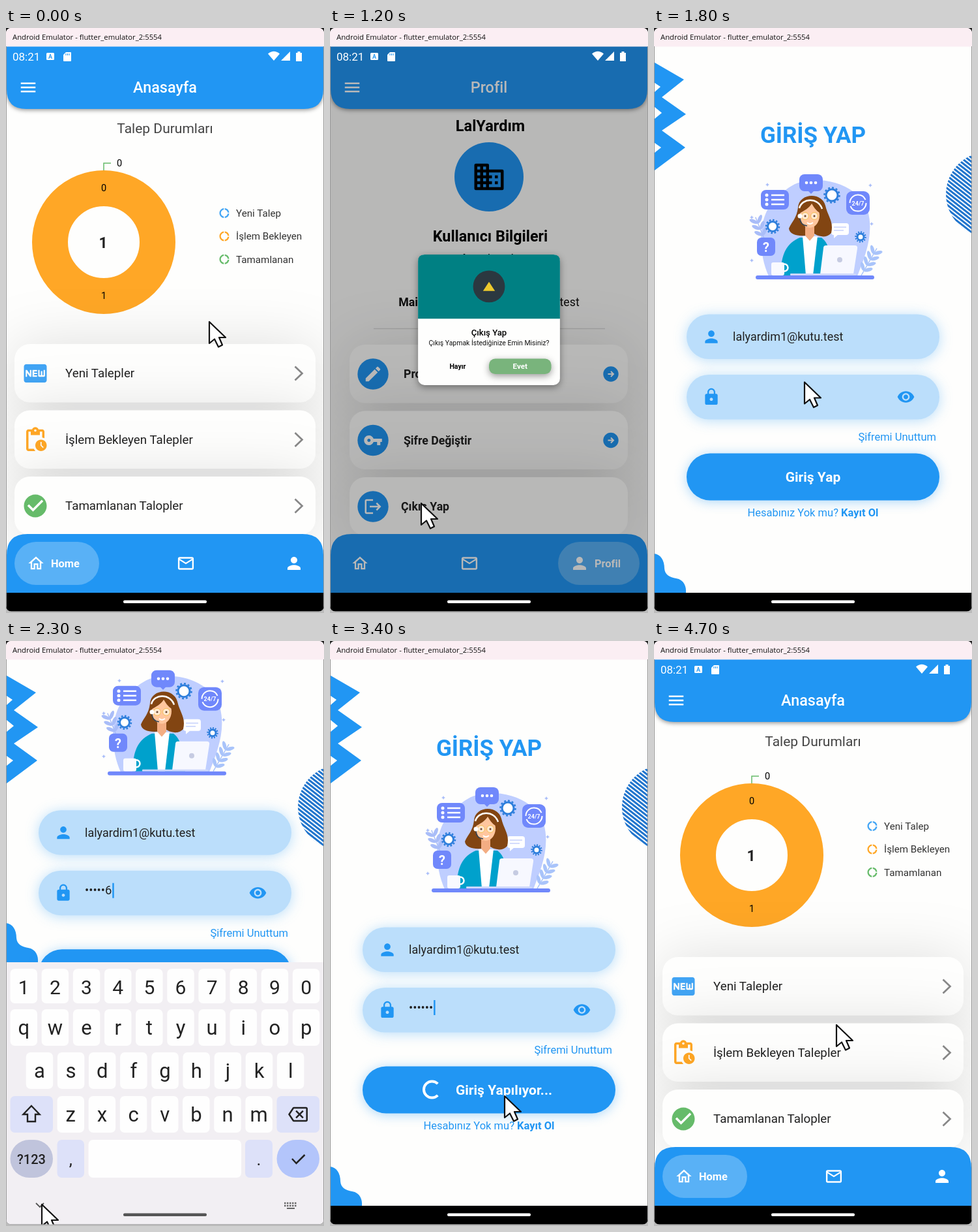
An HTML page for the animation above (4800 ms loop, 488 by 896 pixels).

```html
<!DOCTYPE html>
<html lang="tr">
<head>
<meta charset="utf-8">
<style>
  html, body { margin: 0; width: 100%; height: 100%; overflow: hidden; background: #bbb; }
  svg { display: block; width: 488px; height: 896px; font-family: Roboto, sans-serif; }
  .card { fill: #fefefd; filter: drop-shadow(0 3px 44px #0002); }
  .bar { fill: #2196f3; filter: drop-shadow(0 2px 3px #0006); }
  .field { fill: #bbdefb; filter: drop-shadow(0 2px 10px #2196f350); }
  .dialog { filter: drop-shadow(0 6px 10px #0006); }
</style>
</head>
<body>
<svg id="stage" viewBox="0 0 488 896"></svg>
<script>
const BLUE = '#2196f3', ORANGE = '#ffa726', GREEN = '#66bb6a', SKY = '#42a5f5', INK = '#212121';
const $ = id => document.getElementById(id);

const ICONS = {
  menu: 'M3 18h18v-2H3zM3 13h18v-2H3zM3 6v2h18V6z',
  home: 'M12 5.69l5 4.5V18h-2v-6H9v6H7v-7.81l5-4.5M12 3L2 12h3v8h6v-6h2v6h6v-8h3z',
  mail: 'M20 4H4c-1.1 0-2 .9-2 2v12c0 1.1.9 2 2 2h16c1.1 0 2-.9 2-2V6c0-1.1-.9-2-2-2zm0 14H4V8l8 5 8-5v10zm-8-7L4 6h16z',
  person: 'M12 12c2.21 0 4-1.79 4-4s-1.79-4-4-4-4 1.79-4 4 1.79 4 4 4zm0 2c-2.67 0-8 1.34-8 4v2h16v-2c0-2.66-5.33-4-8-4z',
  office: 'M12 7V4q0-1-1-1H3q-1 0-1 1v16q0 1 1 1h18q1 0 1-1V8q0-1-1-1zM6 19H4v-2h2zm0-4H4v-2h2zm0-4H4V9h2zm0-4H4V5h2zm4 12H8v-2h2zm0-4H8v-2h2zm0-4H8V9h2zm0-4H8V5h2zm10 12h-8v-2h2v-2h-2v-2h2v-2h-2V9h8zm-2-8h-2v2h2zm0 4h-2v2h2z',
  edit: 'M3 17.25V21h3.75L17.81 9.94l-3.75-3.75zM20.71 7.04c.39-.39.39-1.02 0-1.41l-2.34-2.34c-.39-.39-1.02-.39-1.41 0l-1.83 1.83 3.75 3.75z',
  key: 'M12.65 10C11.83 7.67 9.61 6 7 6c-3.31 0-6 2.69-6 6s2.69 6 6 6c2.61 0 4.83-1.67 5.65-4H17v4h4v-4h2v-4zM7 14c-1.1 0-2-.9-2-2s.9-2 2-2 2 .9 2 2-.9 2-2 2z',
  exit: 'M17 7l-1.41 1.41L18.17 11H8v2h10.17l-2.58 2.58L17 17l5-5zM4 5h8V3H4c-1.1 0-2 .9-2 2v14c0 1.1.9 2 2 2h8v-2H4z',
  lock: 'M18 8h-1V6c0-2.76-2.24-5-5-5S7 3.24 7 6v2H6c-1.1 0-2 .9-2 2v10c0 1.1.9 2 2 2h12c1.1 0 2-.9 2-2V10c0-1.1-.9-2-2-2zm-6 9c-1.1 0-2-.9-2-2s.9-2 2-2 2 .9 2 2-.9 2-2 2zm3.1-9H8.9V6c0-1.71 1.39-3.1 3.1-3.1s3.1 1.39 3.1 3.1z',
  eye: 'M12 4.5C7 4.5 2.73 7.61 1 12c1.73 4.39 6 7.5 11 7.5s9.27-3.11 11-7.5c-1.73-4.39-6-7.5-11-7.5zM12 17c-2.76 0-5-2.24-5-5s2.24-5 5-5 5 2.24 5 5-2.24 5-5 5zm0-8c-1.66 0-3 1.34-3 3s1.34 3 3 3 3-1.34 3-3-1.34-3-3-3z',
  done: 'M12 2C6.48 2 2 6.48 2 12s4.48 10 10 10 10-4.48 10-10S17.52 2 12 2zm-2 15l-5-5 1.41-1.41L10 14.17l7.59-7.59L19 8z',
  pending: 'M17 12c-2.76 0-5 2.24-5 5s2.24 5 5 5 5-2.24 5-5-2.24-5-5-5zm1.65 7.35L16.5 17.2V14h1v2.79l1.85 1.85zM18 3h-3.18C14.4 1.84 13.3 1 12 1s-2.4.84-2.82 2H6c-1.1 0-2 .9-2 2v15c0 1.1.9 2 2 2h6.11c-.59-.57-1.07-1.25-1.42-2H6V5h2v3h8V5h2v5.08c.71.1 1.38.31 2 .6V5c0-1.1-.9-2-2-2zm-6 2c-.55 0-1-.45-1-1s.45-1 1-1 1 .45 1 1-.45 1-1 1z',
  fresh: 'M20 4H4c-1.11 0-2 .89-2 2v12c0 1.11.89 2 2 2h16c1.11 0 2-.89 2-2V6c0-1.11-.89-2-2-2zM8.5 15H7.3l-2.55-3.5V15H3.5V9h1.25l2.5 3.5V9H8.5zm5-4.74H11v1.12h2.5v1.26H11v1.11h2.5V15h-4V9h4zm7 3.74c0 .55-.45 1-1 1h-4c-.55 0-1-.45-1-1V9h1.25v4.51h1.13V9.99h1.25v3.51h1.12V9h1.25z',
  donut: 'M11 5.08V2c-5 .5-9 4.81-9 10s4 9.5 9 10v-3.08c-3-.48-6-3.4-6-6.92s3-6.44 6-6.92zM18.97 11H22c-.47-5-4-8.53-9-9v3.08C16 5.51 18.54 8 18.97 11zM13 18.92V22c5-.47 8.53-4 9-9h-3.03c-.43 3-2.97 5.49-5.97 5.92z',
  erase: 'M22 3H7c-.69 0-1.23.35-1.59.88L0 12l5.41 8.11c.36.53.9.89 1.59.89h15c1.1 0 2-.9 2-2V5c0-1.1-.9-2-2-2zm0 16H7.07L2.4 12l4.66-7H22zm-11.59-2L14 13.41 17.59 17 19 15.59 15.41 12 19 8.41 17.59 7 14 10.59 10.41 7 9 8.41 12.59 12 9 15.59z'
};

const icon = (name, cx, cy, size, fill = '#fff') =>
  `<path transform="translate(${cx - size / 2} ${cy - size / 2}) scale(${size / 24})" d="${ICONS[name]}" fill="${fill}"/>`;
const text = (x, y, size, str, fill = INK, weight = 400, anchor = 'start', extra = '') =>
  `<text x="${x}" y="${y}" font-size="${size}" fill="${fill}" font-weight="${weight}" text-anchor="${anchor}" ${extra}>${str}</text>`;
const mid = (x, y, size, str, fill, weight) => text(x, y, size, str, fill, weight, 'middle');
const rect = (x, y, w, h, r, fill, extra = '') =>
  `<rect x="${x}" y="${y}" width="${w}" height="${h}" rx="${r}" fill="${fill}" ${extra}/>`;
const circle = (cx, cy, r, fill, extra = '') => `<circle cx="${cx}" cy="${cy}" r="${r}" fill="${fill}" ${extra}/>`;
const line = (d, stroke, width, extra = '') =>
  `<path d="${d}" fill="none" stroke="${stroke}" stroke-width="${width}" ${extra}/>`;
const shape = (d, fill, extra = '') => `<path d="${d}" fill="${fill}" ${extra}/>`;
const card = (x, y, w) => rect(x, y, w, 89.5, 24, '', 'class="card"');

const appBar = title => shape('M1 28H487V94Q487 124 457 124H31Q1 124 1 94Z', '', 'class="bar"') +
  icon('menu', 34, 91, 30) + mid(244, 99, 23.4, title, '#fff', 500);

const navBar = (pillX, pillW, label, labelX, mailX, personX) =>
  shape('M1 865V807Q1 775 33 775H455Q487 775 487 807V865Z', BLUE) +
  rect(pillX, 787, pillW, 66, 33, '#fff', 'opacity=".25"') +
  icon('home', 46, 820, 28) + icon('mail', mailX, 820, 29) + icon('person', personX, 820, 30) +
  text(labelX, 825.5, 16.4, label, '#fff', 700);

const statusBar = () => text(10, 50, 17, '08:21', '#fff') + rect(62, 38, 12, 11, 1.5, '#fff') +
  mid(68, 47, 9, 'A', BLUE, 700) + shape('M92 37h7q1 0 1 1v12q0 1-1 1H89q-1 0-1-1V41z', '#fff') +
  line('M92 39v3m2.500-3v3m2.500-3v3', BLUE, 1) +
  shape('M402 39.500Q411 32 420 39.500L411 50ZM436 36V50H422ZM445 38h2.500v-2h4v2h2.500v13h-9z', '#fff');

function homeScreen() {
  const legend = [['Yeni Talep', SKY], ['İşlem Bekleyen', ORANGE], ['Tamamlanan', GREEN]];
  const rows = [['Yeni Talepler', 'fresh', SKY], ['İşlem Bekleyen Talepler', 'pending', ORANGE], ['Tamamlanan Talopler', 'done', GREEN]];
  return mid(244, 161, 21, 'Talep Durumları', '#444') +
    circle(150, 328, 82.5, 'none', `id="sweep" stroke="${ORANGE}" stroke-width="55" pathLength="1" transform="rotate(-90 150 328)"`) +
    `<g id="labels">${line('M150 218V207H161', GREEN, 1.5)}${mid(174, 212, 14.5, '0', '#000')}
      ${mid(150, 250, 14.5, '0', '#000')}${mid(150, 415, 14.5, '1', '#000')}${mid(149, 337, 23, '1', INK, 700)}</g>` +
    legend.map(([name, color], i) => icon('donut', 335, 283.5 + i * 35.4, 18, color) + text(353, 289 + i * 35.4, 15.2, name, '#333')).join('') +
    rows.map(([name, glyph, color], i) => {
      const y = 484 + i * 101.5;
      return card(13, y, 462) + icon(glyph, 45, y + 45, 42, color) + text(91, y + 51, 18.8, name) +
        line(`M443.500 ${y + 34.5}l11 10.500-11 10.500`, '#888', 2.7);
    }).join('') +
    appBar('Anasayfa') + navBar(13, 130, 'Home', 69, 276, 442);
}

function profileScreen() {
  const info = [['Adı', 'LalYardım'], ['Soyadı', '5/18'], ['Mail Adresi', 'lalyardim18@kutu.test']];
  const rows = [['Profil Güncelle', 'edit', 113], ['Şifre Değiştir', 'key', 113], ['Çıkış Yap', 'exit', 109]];
  return mid(246, 158, 23.5, 'LalYardım', '#000', 700) + circle(244, 228, 53, BLUE) + icon('office', 244, 228, 54, '#000') +
    mid(246, 327, 23.3, 'Kullanıcı Bilgileri', '#000', 700) +
    info.map(([key, value], i) => mid(244, 360 + i * 33, 17.8, `<tspan font-weight="700">${key}:</tspan> ${value}`, '#111')).join('') +
    line('M67 460.500H422', '#ddd', 1.5) +
    rows.map(([name, glyph, x], i) => {
      const y = 485 + i * 101.5;
      return card(30, y, 427) + circle(66, y + 45, 23.7, BLUE) + icon(glyph, 66, y + 45, 30) + text(x, y + 51, 17.7, name, INK, 700) +
        (i < 2 ? circle(431, y + 45, 11.7, BLUE) + line(`M426.500 ${y + 45}h8m-3.500-4l4 4-4 4`, '#fff', 2) : '');
    }).join('') +
    appBar('Profil') + navBar(350, 125, 'Profil', 406, 214, 383);
}

const dialog = () => rect(48, 267, 392, 360, 18, '#fefefd', 'class="dialog"') +
  shape('M48 444V285Q48 267 66 267H422Q440 267 440 285V444Z', '#008083') +
  circle(244, 355, 44, '#2b3840') + shape('M244 342L260.500 367.500H227.500Z', '#ecc92d') +
  mid(244, 490, 23.6, 'Çıkış Yap', '#000', 500) + mid(244, 518, 18.8, 'Çıkış Yapmak İstediğinize Emin Misiniz?', '#111') +
  mid(157.5, 581.5, 19, 'Hayır', '#000', 700) +
  rect(244, 554, 172, 42.5, 17, '#79b47c', 'class="dialog"') + mid(330, 582, 21, 'Evet', '#fff', 700);

const gear = (x, y, r) => circle(x, y, r, '#fff', 'stroke="#2f7fdc" stroke-width="3"') +
  circle(x, y, r + 2.5, 'none', 'stroke="#2f7fdc" stroke-width="2.500" pathLength="24" stroke-dasharray="1"');

function plant(x, y, tilt, count, color) {
  let leaves = '';
  for (let i = 0; i < count; i++)
    for (const side of [-1, 1])
      leaves += `<ellipse cx="${side * 7}" cy="${-8 - i * 10}" rx="7" ry="2.800" fill="${color}" transform="rotate(${side * -45} 0 ${-8 - i * 10})"/>`;
  return `<g transform="translate(${x} ${y}) rotate(${tilt})">${line(`M0 0V${-count * 10 - 8}`, color, 1.5)}${leaves}</g>`;
}

function illustration() {
  const violet = '#7088fb';
  return shape('M176 380C158 340 160 285 187 262C204 245 218 233 246 233C282 232 318 250 328 280C338 315 324 350 312 380Z', '#bfceff') +
    plant(170, 325, -22, 3, '#a9bdf8') + plant(318, 379, 30, 4, '#a9c4fa') +
    rect(164, 248, 43, 30, 8, violet) +
    [256, 263, 270].map(y => circle(173, y, 2.5, '#fff') + line(`M180 ${y}H200`, '#fff', 2.5)).join('') +
    rect(223, 224, 36, 26, 8, violet) + shape('M236 249h10l-5 5z', violet) + [234, 241, 248].map(x => circle(x, 237, 2.3, '#fff')).join('') +
    gear(273, 256, 9) + gear(182, 304, 7.5) + gear(317, 320, 5) +
    rect(295, 250, 36, 36, 9, violet) +
    circle(313, 268, 12.5, 'none', 'stroke="#fff" stroke-width="2" pathLength="8" stroke-dasharray="3.500 .5"') +
    mid(313, 271.5, 9, '24/7', '#fff', 700) +
    rect(158, 321, 28, 28, 7, violet) + mid(172, 343, 20, '?', '#fff', 700) +
    rect(272, 299, 27, 18, 4, '#fff') + shape('M276 316v6l7-6z', '#fff') + line('M276 305H295M276 310H291', '#c6d1fb', 1.5) +
    shape('M221 275C222 253 257 250 263 272C267 289 276 296 272 314C264 323 252 319 246 315C230 321 208 319 207 307C212 296 219 291 221 275Z', '#824512') +
    shape('M194 379C195 345 204 329 224 321H257C268 329 274 350 275 379Z', '#00a1cc') +
    shape('M228 319H251L244 379H233Z', '#fff') + shape('M232 300H246V318L239 326L232 318Z', '#f3ad83') +
    '<ellipse cx="239" cy="287" rx="15" ry="19" fill="#ffc69e"/>' +
    shape('M223 284C226 264 250 258 256 284C248 280 244 272 242 269C238 276 230 280 223 284Z', '#824512') +
    line('M223 276C227 260 252 259 258 277', '#fff', 2.5) +
    circle(232, 288, 5.5, '#ffe9d2', 'stroke="#f5bf52"') + circle(246, 288, 5.5, '#ffe9d2', 'stroke="#f5bf52"') +
    circle(232, 288, 1.5, '#643') + circle(246, 288, 1.5, '#643') +
    line('M235 298Q239 302 244 298', '#fff', 2) + line('M224 290Q224 302 235 303', '#345', 1.5) + circle(224, 288, 3.5, '#fff') +
    shape('M264 333H308Q313 333 312 338L306 377H255L260 337Q260 333 264 333Z', '#f7f8ff') + circle(285, 355, 4, '#c6cbe2') +
    rect(209, 376, 101, 3, 1, '#cdd7fb') + circle(200, 367, 5.5, 'none', 'stroke="#fff" stroke-width="2.500"') + rect(180, 359, 20, 20, 3, '#f9faff') +
    rect(156, 379, 182, 6, 3, violet) +
    [[174, 240], [332, 241], [150, 290], [150, 356], [334, 300]].map(([x, y]) => shape(`M${x} ${y - 3}l1 2 2 1-2 1-1 2-1-2-2-1 2-1z`, '#a9bdf8')).join('');
}

const loginScreen = () =>
  shape('M1 53L46 79L12 106L49 132L12 157L48 183L1 218Z', BLUE) + shape('M1 84l9 6-9 8zM1 121l11 9-11 9zM1 176l10 7-10 8z', '#fefefd') +
  `<defs><pattern id="stripes" width="5" height="5" patternUnits="userSpaceOnUse" patternTransform="rotate(38)">${rect(0, 0, 5, 3, 0, '#1f74cd')}</pattern></defs>` +
  circle(513, 254.5, 65, 'url(#stripes)') +
  shape('M0 805C10 806 16 815 16 828C17 838 24 841 34 843C46 845 50 855 49 866H0Z', BLUE, 'id="blob"') +
  `<g id="form">${mid(244, 176, 35, 'GİRİŞ YAP', BLUE, 700)}${illustration()}` +
  rect(50, 438.5, 388, 68.5, 34, '', 'class="field"') + icon('person', 88, 473, 29, BLUE) + text(121, 479, 18, 'lalyardim1@kutu.test') +
  rect(50, 531, 388, 68.5, 34, '', 'class="field"') + icon('lock', 88, 565, 29, BLUE) + icon('eye', 386.5, 565, 28, BLUE) +
  text(121, 567.5, 18.4, '', INK, 400, 'start', 'id="password"') + rect(0, 550, 2.5, 23, 0, BLUE, 'id="caret"') +
  text(433, 632, 16.5, 'Şifremi Unuttum', BLUE, 400, 'end') +
  rect(50, 651.5, 388, 72, 36, BLUE, 'style="filter:drop-shadow(0 2px 9px #2196f360)"') +
  `<g id="idle">${mid(244, 695, 21, 'Giriş Yap', '#fff', 700)}</g>` +
  `<g id="busy">${circle(156.5, 687, 12.5, 'none', 'id="spinner" stroke="#fff" stroke-width="4" pathLength="4" stroke-dasharray="3 1"')}
    ${text(193, 695, 21, 'Giriş Yapılıyor...', '#fff', 700)}</g>` +
  mid(244, 748, 16.5, 'Hesabınız Yok mu? <tspan font-weight="700">Kayıt Ol</tspan>', BLUE) + '</g>';

function keyboard() {
  const key = (x, y, w, h, label, fill = '#fefefe', r = 7, size = 32) => rect(x, y, w, h, r, fill) + mid(x + w / 2, y + 39, size, label, '#222');
  const row = (chars, x, y, h, size) => [...chars].map((c, i) => key(x + i * 48.15, y, 41.5, h, c, '#fefefe', 7, size)).join('');
  const soft = '#dde1f9';
  return rect(0, 492, 488, 404, 0, '#f2eff3') +
    row('1234567890', 6.5, 502, 53, 30) + row('qwertyuiop', 6.5, 564, 56, 31) + row('asdfghjkl', 30.7, 630, 56, 31) + row('zxcvbnm', 78.5, 697, 56, 31) +
    key(6.5, 697, 65.5, 56, '', soft) + line('M39 712l12.500 13h-6.500v11h-12v-11h-6.500z', '#222', 2.4) +
    key(415.5, 697, 65.5, 56, '', soft) + icon('erase', 448, 725, 30, '#222') +
    rect(6.5, 764, 65.5, 58, 29, '#c0c4dc') + mid(39, 801, 20, '?123', '#222', 500) +
    key(78.5, 764, 41.5, 58, ',', soft, 7, 26) + key(126.5, 764, 234.5, 58, '') + key(367, 764, 42, 58, '.', soft, 7, 26) +
    rect(415.5, 764, 65.5, 58, 29, '#b3c5fb') + line('M439 793l6.500 7 13-13', '#222', 2.5) +
    line('M46 861l6 6 6-6', '#555', 1.8) + line('M427 861H447M427 865H447', '#666', 2.5, 'stroke-dasharray="2.500 1.500"') + line('M431 869H443', '#666', 2) +
    rect(180, 876.5, 128, 4.5, 2, '#555');
}

$('stage').innerHTML = `
  <clipPath id="window"><rect width="488" height="893.5" rx="8"/></clipPath>
  ${rect(0, 0, 488, 12, 0, '#222')}
  <g clip-path="url(#window)">
    ${rect(0, 0, 488, 896, 0, '#fefefd')}
    <g id="home">${homeScreen()}</g>
    <g id="profile">${profileScreen()}</g>
    <g id="login">${loginScreen()}</g>
    ${rect(1, 28, 486, 837, 0, '#000', 'id="dim"')}
    <g id="status">${statusBar()}</g>
    <g id="dialog">${dialog()}</g>
    ${rect(0, 865, 488, 31, 0, '#000')}${rect(180, 876.5, 128, 4.5, 2, '#fff')}
    <g id="keyboard">${keyboard()}</g>
    ${rect(0, 0, 488, 28.5, 0, '#fbeef3')}
    ${text(10, 18, 11.3, 'Android Emulator - flutter_emulator_2:5554', '#111', 400, 'start', 'font-family="Open Sans, sans-serif"')}
    ${line('M.5 28V894M487.500 28V894', '#999', 1)}
    <circle id="ripple"/>
    <path id="cursor" d="M0 0V33L8 26.500L14 38.500L20 35.500L15 24H25Z" fill="#fff" stroke="#111" stroke-width="2.200" stroke-linejoin="round"/>
  </g>`;

// time, x, y of the pointer tip
const POINTER = [[0, 312, 450], [100, 335, 500], [400, 434, 800], [500, 438, 812], [600, 425, 780], [700, 392, 719], [900, 140, 728], [1200, 140, 728],
  [1600, 306, 572], [1700, 262, 525], [1900, 200, 560], [2200, 110, 770], [2300, 55, 863], [2400, 55, 863], [2500, 54, 844], [3000, 50, 842],
  [3300, 262, 692], [3400, 268, 697], [3600, 268, 685], [3700, 268, 640], [4000, 266, 432], [4200, 300, 435], [4400, 316, 480], [4700, 280, 588]];
// start, end, x, y, radius, colour of each tap
const TAPS = [[500, 600, 442, 820, 28, '#fff4'], [1100, 1200, 140, 733, 34, '#0001'], [1600, 1800, 311, 584, 24, '#fff3'], [3300, 3400, 264, 690, 28, '#fff3']];

const clamp = v => Math.max(0, Math.min(1, v));
const show = (id, on) => $(id).style.display = on ? '' : 'none';
const move = (id, x, y) => $(id).setAttribute('transform', `translate(${x} ${y})`);

function pointerAt(t) {
  const i = POINTER.findLastIndex(p => p[0] <= t), a = POINTER[i], b = POINTER[i + 1] || a;
  const f = (t - a[0]) / (b[0] - a[0] || 1);
  return [a[1] + (b[1] - a[1]) * f, a[2] + (b[2] - a[2]) * f];
}

function render(t) {
  const screen = t < 600 || t >= 3700 ? 'home' : t < 1800 ? 'profile' : 'login';
  for (const id of ['home', 'profile', 'login']) show(id, id === screen);
  show('status', screen !== 'login');

  const sweep = t < 3700 ? 1 : clamp((t - 3850) / 410);
  $('sweep').setAttribute('stroke-dasharray', `${sweep} 2`);
  show('labels', t < 3700 || t >= 4400);

  const open = screen === 'profile' ? 1 - (1 - clamp((t - 1100) / 300)) ** 2 : 0;
  $('dim').setAttribute('opacity', open * 0.5);
  show('dialog', open > 0);
  $('dialog').setAttribute('transform', `translate(244 447) scale(${open}) translate(-244 -447)`);

  const lift = t < 2500 ? clamp((t - 1800) / 200) : clamp(1 - (t - 2400) / 400) ** 2;
  move('form', 0, -179.3 * lift);
  move('blob', 0, -373 * lift);
  move('keyboard', 0, 404 * (1 - lift));
  show('keyboard', lift > 0);

  const typed = Math.round(6 * clamp((t - 1900) / 400)), peek = typed && t < 2500;
  const dots = typed - (peek ? 1 : 0);
  $('password').textContent = '•'.repeat(dots) + (peek ? typed : '');
  $('caret').setAttribute('x', 121 + dots * 6.35 + (peek ? 10.5 : 0));
  show('caret', t >= 1900);
  show('idle', t < 3300);
  show('busy', t >= 3300);
  $('spinner').setAttribute('transform', `rotate(${45 + (t - 3400) * 0.9} 156.5 687)`);

  const tap = TAPS.find(([from, to]) => t >= from && t < to);
  show('ripple', tap);
  if (tap) ['cx', 'cy', 'r', 'fill'].forEach((name, i) => $('ripple').setAttribute(name, tap[i + 2]));
  move('cursor', ...pointerAt(t));
}

function tick() {
  render(Math.floor(performance.now() % 4800 / 100) * 100);
  requestAnimationFrame(tick);
}
tick();
</script>
</body>
</html>
```
